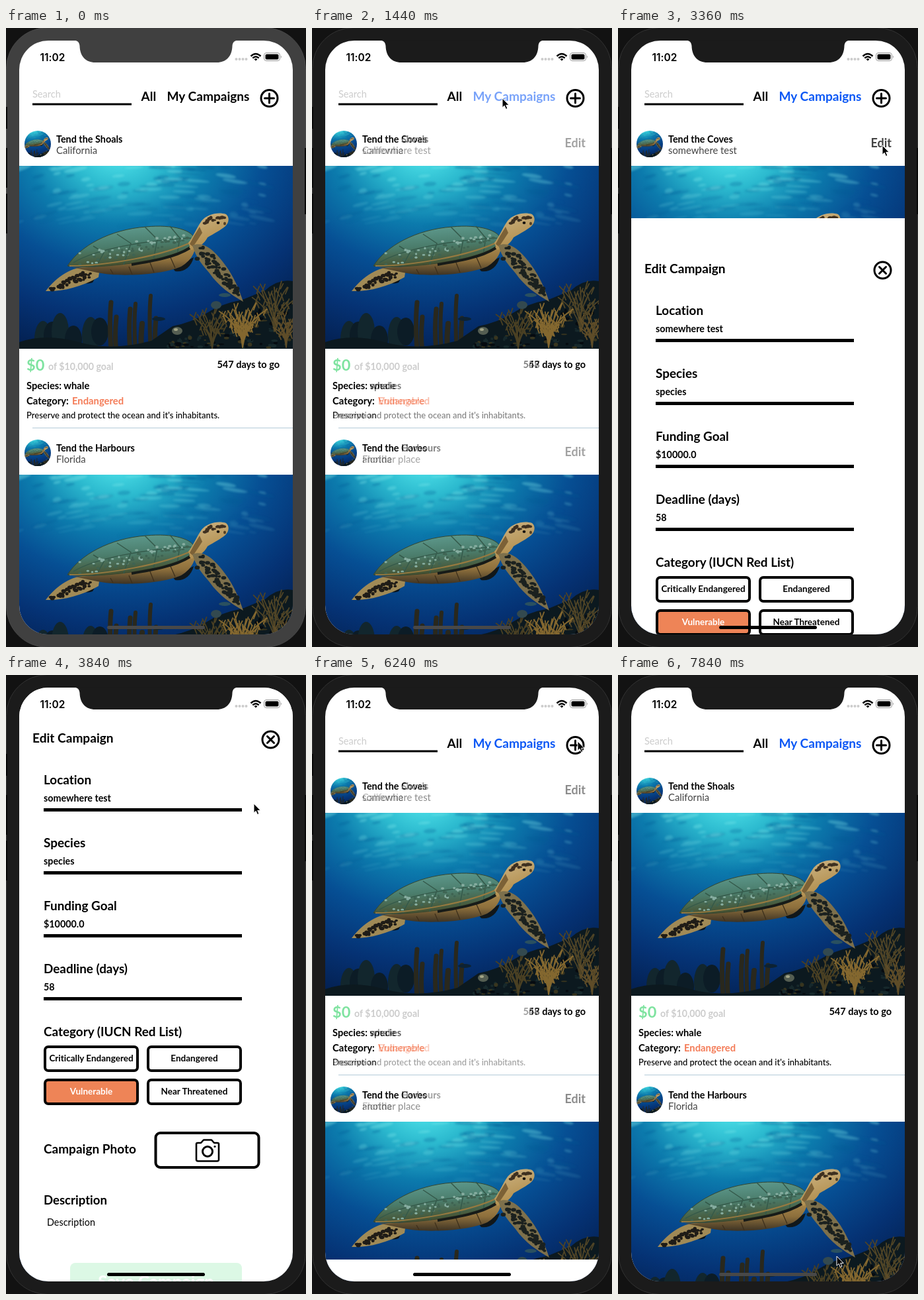
Recreate the animation shown at these times as an HTML page. Size 454 px wide and 934 px high, loop 8000 ms.

```html
<!DOCTYPE html>
<html lang="en">
<head>
<meta charset="utf-8">
<title>Campaign app</title>
<style>
  html, body { margin: 0; width: 100%; height: 100%; overflow: hidden; background: #111; }
  #stage { display: block; width: 100vw; height: 100vh; font-family: Lato, "Open Sans", sans-serif; font-variant-ligatures: none; }
  .b { font-weight: 700; }
  #lists { isolation: isolate; }
  #mine { mix-blend-mode: plus-lighter; }
</style>
</head>
<body>
<svg id="stage" viewBox="0 0 454 934" xmlns="http://www.w3.org/2000/svg">
  <defs>
    <radialGradient id="sea" gradientUnits="userSpaceOnUse" cx="150" cy="-25" r="340" gradientTransform="translate(150 0) scale(1.25 1) translate(-150 0)">
      <stop offset="0" stop-color="#55eaee"/>
      <stop offset=".17" stop-color="#2cbacf"/>
      <stop offset=".33" stop-color="#0c7bad"/>
      <stop offset=".52" stop-color="#064f94"/>
      <stop offset=".74" stop-color="#053274"/>
      <stop offset="1" stop-color="#031a45"/>
    </radialGradient>
    <linearGradient id="shell" x1="0" y1="0" x2=".25" y2="1">
      <stop offset="0" stop-color="#63a196"/>
      <stop offset=".55" stop-color="#4b7d6c"/>
      <stop offset="1" stop-color="#46502f"/>
    </linearGradient>
    <linearGradient id="belly" x1="0" y1="0" x2="0" y2="1">
      <stop offset="0" stop-color="#b99655"/>
      <stop offset=".6" stop-color="#8d6f3c"/>
      <stop offset="1" stop-color="#3d3324"/>
    </linearGradient>
    <linearGradient id="skin" x1="0" y1="0" x2=".4" y2="1">
      <stop offset="0" stop-color="#cdb586"/>
      <stop offset="1" stop-color="#b08c4a"/>
    </linearGradient>
    <filter id="soft" x="-10%" y="-10%" width="120%" height="120%"><feGaussianBlur stdDeviation="1.5"/></filter>
    <symbol id="photo" viewBox="0 0 414 276" preserveAspectRatio="none"></symbol>
    <clipPath id="screen"><rect x="20" y="19" width="414" height="896" rx="44"/></clipPath>
    <clipPath id="face"><circle cx="48" cy="175" r="20"/></clipPath>
  </defs>

  <rect width="454" height="934" fill="#121212"/>
  <rect id="bezel" x="0.5" y="-0.5" width="453" height="935" rx="62" stroke-width="1"/>
  <path d="M0 119h2v33h-2zM0 181h2v60h-2zM0 250h2v60h-2zM452 181h2v100h-2z" fill="#080808"/>

  <g clip-path="url(#screen)">
    <rect x="20" y="19" width="414" height="896" fill="#fff"/>
    <g id="home"></g>
    <g id="lists"><g id="all"></g><g id="mine"></g></g>
    <g id="modal"></g>
    <rect id="bar" x="153" y="902" width="148" height="5" rx="2.5"/>
  </g>

  <path id="notch" d="M102 18.500C109 19 111 22 111.500 27C112 43 121 52 135 52H319C333 52 342 43 342.500 27C343 22 345 19 352 18.500Z"/>
  <g id="status">
    <text x="51.500" y="49.500" font-family="Inter, sans-serif" font-weight="600" font-size="15.500">11:02</text>
    <g fill="#ccc"><circle cx="348.500" cy="47" r="2"/><circle cx="353.500" cy="47" r="2"/><circle cx="358.500" cy="47" r="2"/><circle cx="363.500" cy="47" r="2"/></g>
    <g fill="none" stroke="#000" stroke-width="2.400"><path d="M370.500 42.500Q378 35.500 385.500 42.500M373.300 45.300Q378 41 382.700 45.300"/></g>
    <path d="M375.600 47.200Q378 45 380.400 47.200L378 49.600Z"/>
    <rect x="390.500" y="37.500" width="24" height="12" rx="3.500" fill="none" stroke="#999"/>
    <rect x="392.500" y="39.500" width="20" height="8" rx="2"/>
    <path d="M416 41.500Q418 43.500 416 45.500Z" fill="#999"/>
  </g>
  <path id="cursor" d="M0 0V14.200L3.200 11.300L5.500 16.500L7.900 15.400L5.700 10.400H10.200Z" fill="#000" stroke="#fff" stroke-width="1"/>
</svg>
<script>
const LOOP = 8000, STEP = 160, CARD = 466;
const $ = id => document.getElementById(id);

let seed = 7;
const rnd = () => (seed = seed * 16807 % 2147483647) / 2147483647;
const jitter = w => (rnd() - .5) * w;
const times = (n, f) => Array.from({ length: n }, (_, i) => f(i)).join('');

const text = (x, y, size, str, opt = '') => `<text x="${x}" y="${y}" font-size="${size}" ${opt}>${str}</text>`;
const bold = (x, y, size, str, opt = '') => text(x, y, size, str, 'class="b" ' + opt);
const shape = (d, fill, opt = '') => `<path d="${d}" fill="${fill}" ${opt}/>`;
const blob = (x, y, rx, ry, fill, opt = '') => `<ellipse cx="${x}" cy="${y}" rx="${rx}" ry="${ry}" fill="${fill}" ${opt}/>`;

// Underwater scene
function ripples() {
  const one = () => {
    const y = rnd() * 92, x = rnd() * 370;
    return blob(x, y, 5 + rnd() * 16, 1 + rnd() * 2.5, rnd() < .5 ? '#8af0f0' : '#045a94',
      `opacity="${.36 * (1 - y / 110)}" transform="rotate(${-18 + x / 12} ${x} ${y})"`);
  };
  return `<g filter="url(#soft)">${times(130, one)}</g>`;
}

function spots(x0, y0, x1, y1, width, n, fill, size) {
  return times(n, i => {
    const k = (i + .5) / n, w = width * (1 - k * .7);
    return blob(x0 + (x1 - x0) * k + jitter(w), y0 + (y1 - y0) * k + jitter(w), size * (.6 + rnd() * .6), size * (.5 + rnd() * .4), fill);
  });
}

function fan(x, y, h, n, color) {
  const d = times(n, i => {
    const a = (i / (n - 1) - .5) * 1.15, len = h * (.65 + rnd() * .35);
    const ex = x + Math.sin(a) * len, ey = y - Math.cos(a) * len;
    const twigs = times(4, j => {
      const k = .4 + j * .15, px = x + (ex - x) * k, py = y + (ey - y) * k;
      return `M${px} ${py}l${j % 2 ? 4 : -4} ${-7 - rnd() * 5}`;
    });
    return `M${x} ${y}Q${x + jitter(8)} ${y - len * .5} ${ex} ${ey}` + twigs;
  });
  return `<path d="${d}" fill="none" stroke="${color}" stroke-width="1.800" stroke-linecap="round"/>`;
}

const tube = (x, top, w, color) => `<path d="M${x} 280Q${x - 3} ${top + 30} ${x} ${top}" stroke="${color}" stroke-width="${w}" stroke-linecap="round" fill="none"/>`;

function reef() {
  const left = [36, 50, 62, 82, 108, 122].map((x, i) => blob(x, 262 - i % 3 * 6, 13, 28 - i % 2 * 7, i % 2 ? '#0c1c26' : '#12262d')).join('');
  const tubes = [[139, 206, 7], [147, 228, 7], [168, 216, 7], [176, 208, 6], [199, 196, 6], [207, 230, 7], [186, 238, 8]]
    .map(([x, y, w]) => tube(x, y, w, '#29281d')).join('');
  return left + tubes +
    shape('M0 266Q40 252 90 266T200 264L232 242Q262 236 284 222T338 202L372 188Q392 170 414 174V276H0Z', '#0c191f') +
    times(110, () => { const x = 222 + rnd() * 192; return blob(x, 274 - rnd() * (x - 205) * .37, 1 + rnd() * 4, 1 + rnd() * 2, ['#38351f', '#17292c', '#060b10'][Math.floor(rnd() * 3)]); }) +
    fan(292, 276, 66, 8, '#4a4023') + fan(386, 250, 78, 9, '#4f4426') + fan(338, 274, 70, 13, '#83672f') + fan(404, 274, 52, 8, '#5e4c28') +
    blob(239, 249, 8, 6, '#555e52') + blob(237, 247, 3, 2, '#a3a587') + blob(298, 210, 8, 6, '#33494f') + blob(311, 195, 9, 3, '#2a5060') + blob(211, 231, 10, 3, '#0d2233');
}

function turtle() {
  const shell = 'M73 151C92 121 137 96 192 92C232 88 264 97 266 112C258 127 235 134 205 141C165 149 110 155 73 151Z';
  const seams = 'M82 146C115 126 190 112 260 109M112 121L128 131L117 151M148 103L169 117L158 149M190 92L209 111L203 142M228 91L243 109L239 134';
  return shape('M232 154L264 138C260 154 248 161 236 159Z', '#11171a') +
    shape('M84 165Q104 160 118 164L111 176Q94 182 84 165Z', '#0b1219') +
    shape('M122 155C92 146 62 160 40 189C64 190 94 183 120 168Z', '#a08a56') +
    spots(110, 162, 48, 186, 16, 36, '#1f1c17', 3.3) +
    shape('M80 153C120 156 200 142 262 110C272 124 262 142 245 152C215 165 150 168 118 161Z', 'url(#belly)') +
    `<path d="M138 156l4 7M166 152l5 12M198 146l6 15M228 136l8 18" stroke="#3d2f1b" fill="none" stroke-width="1.300"/>` +
    shape(shell, 'url(#shell)', 'stroke="#344630" stroke-width="1"') +
    `<path d="${seams}" fill="none" stroke="#34594a" stroke-width="1.500"/>` +
    spots(100, 139, 248, 106, 25, 40, '#86ada0', 2.2) +
    spots(100, 143, 256, 110, 22, 34, '#3f6352', 2.4) +
    `<path d="M76 151C130 151 220 136 265 113" fill="none" stroke="#977a40" stroke-width="2"/>` +
    `<path d="M170 149C200 144 236 138 258 124" fill="none" stroke="#171b18" stroke-width="4"/>` +
    shape('M256 116C264 106 268 94 276 83C284 73 301 69 313 73C319 78 317 86 312 91C305 97 295 102 285 108C281 116 272 124 260 127Z', 'url(#skin)') +
    shape('M258 118Q265 104 273 92L277 101Q270 112 263 122Z', '#7c6136') +
    spots(280, 84, 311, 77, 9, 14, '#3e3020', 3) + blob(301, 86, 2.4, 2, '#15120f') + blob(311, 87, 2, 2.5, '#514027') +
    shape('M262 120C280 113 296 128 312 150C324 166 332 184 339 205C320 194 302 182 288 162C278 150 268 140 262 120Z', '#7d704c') +
    spots(276, 130, 332, 194, 22, 54, '#1b211f', 3.6);
}

$('photo').innerHTML = '<rect width="414" height="276" fill="url(#sea)"/>' + ripples() + reef() + turtle();

// Campaign list
const cross = (x, y, arms) => `<g fill="none" stroke="#000" stroke-width="3"><circle cx="${x}" cy="${y}" r="12.500"/><path stroke-linecap="round" transform="translate(${x} ${y})" d="${arms}"/></g>`;

const cardBase = i => `<g transform="translate(0 ${i * CARD})">
  <use href="#photo" x="20" y="208" width="414" height="276"/>
  <g clip-path="url(#face)"><use href="#photo" x="18" y="155" width="60" height="40"/></g>
  ${bold(31, 517, 23.5, '$0', 'fill="#7fe3a0"')}
  ${bold(64, 516, 14.2, 'of $10,000 goal', 'fill="#ccc"')}
  ${bold(31, 568, 14.8, 'Category:')}
  <path d="M40 603.500H434" stroke="#b4cbd9"/>
</g>`;

const cardText = (c, i) => `<g transform="translate(0 ${i * CARD})">
  ${bold(76, 173, 14.4, c.title)}
  ${text(76, 190, 14.8, c.place, 'fill="#444"')}
  ${c.edit ? bold(414, 180, 18, 'Edit', 'fill="#444" text-anchor="end"') : ''}
  ${bold(414, 513, 14.5, c.days + ' days to go', 'text-anchor="end"')}
  ${bold(31, 545, 14.7, 'Species: ' + c.species)}
  ${bold(100, 568, 14.8, c.status, 'fill="#f47c58"')}
  ${text(31, 589, 13, c.about, 'font-weight="500"')}
</g>`;

const open = { days: 547, species: 'whale', status: 'Endangered', about: "Preserve and protect the ocean and it's inhabitants." };
const own = { title: 'Tend the Coves', days: 58, species: 'species', status: 'Vulnerable', about: 'Description', edit: true };

$('home').innerHTML = text(40, 105, 14.6, 'Search', 'fill="#ccc"') +
  '<rect x="40" y="113.500" width="150" height="3"/>' +
  bold(204.5, 110, 19, 'All') + bold(243.5, 110, 19.1, 'My Campaigns', 'id="tab"') +
  cross(398.5, 106, 'M-7 0H7M0 -7V7') + cardBase(0) + cardBase(1);
$('all').innerHTML = cardText({ ...open, title: 'Tend the Shoals', place: 'California' }, 0) +
  cardText({ ...open, title: 'Tend the Harbours', place: 'Florida' }, 1);
$('mine').innerHTML = cardText({ ...own, place: 'somewhere test' }, 0) + cardText({ ...own, place: 'another place' }, 1);

// Edit form
const field = ([label, value], i) => bold(57, 165 + i * 95, 18.9, label) + bold(57, 191 + i * 95, 14.3, value) +
  `<rect x="57" y="${201 + i * 95}" width="300" height="5"/>`;
const choice = (label, i) => {
  const x = 57 + i % 2 * 156, y = 559 + (i >> 1) * 50, on = label === 'Vulnerable';
  return `<rect x="${x + 2}" y="${y + 2}" width="140" height="36" rx="5" fill="${on ? '#ee8457' : '#fff'}" stroke="#000" stroke-width="4"/>` +
    bold(x + 72, y + 24, 13.5, label, `text-anchor="middle" fill="${on ? '#fff' : '#000'}"`);
};
$('modal').innerHTML = '<rect x="20" y="19" width="414" height="896" fill="#fff"/>' +
  bold(40, 102, 19.1, 'Edit Campaign') + cross(400.5, 97.5, 'M-5 -5L5 5M5 -5L-5 5') +
  [['Location', 'somewhere test'], ['Species', 'species'], ['Funding Goal', '$10000.0'], ['Deadline (days)', '58']].map(field).join('') +
  bold(57, 545, 18.9, 'Category (IUCN Red List)') +
  ['Critically Endangered', 'Endangered', 'Vulnerable', 'Near Threatened'].map(choice).join('') +
  bold(57, 722, 19, 'Campaign Photo') +
  `<g fill="none" stroke="#000"><rect x="226.500" y="691" width="156" height="52" rx="7" stroke-width="4"/>
   <path stroke-width="2.600" stroke-linejoin="round" d="M290 706H295L299 701.500H311L315 706H320Q322 706 322 708V731Q322 733.500 319.500 733.500H290.500Q288 733.500 288 731V708Q288 706 290 706Z"/>
   <circle cx="305" cy="719" r="7.500" stroke-width="3"/></g><circle cx="316" cy="711.500" r="1.600"/>` +
  bold(57, 799, 18.6, 'Description') + text(62, 831, 14.4, 'Description') +
  '<rect x="97" y="887" width="260" height="50" rx="8" fill="#dcf8e5"/>' +
  bold(227, 925, 26, 'Save Campaign', 'text-anchor="middle" fill="#fff"');

// Motion
const clamp = v => Math.min(1, Math.max(0, v));
const ramp = (t, a, b) => clamp((t - a) / (b - a));
const spring = ms => {
  if (ms <= 0) return 0;
  const k = ms * .0163, p = 1 - (1 + k) * Math.exp(-k);
  return p > .99 ? 1 : p;
};

// Pointer stops: time, x, y
const stops = [[0, 470, 420], [1120, 288, 106], [2240, 288, 106], [3040, 400, 177], [3360, 400, 177], [3840, 375, 194],
  [4320, 366, 300], [4640, 360, 332], [4960, 360, 332], [5600, 402, 100], [6240, 402, 100], [7840, 331, 877]];

// Speed at a stop: zero at rests, else the slope between its neighbours
function speed(i, axis) {
  const a = stops[i - 1], b = stops[i], c = stops[i + 1];
  if (!a || !c || a[axis] === b[axis] || b[axis] === c[axis]) return 0;
  return (c[axis] - a[axis]) / (c[0] - a[0]);
}

function pointer(t, axis) {
  const i = stops.findIndex(s => s[0] > t);
  if (i < 0) return stops[stops.length - 1][axis];
  const a = stops[i - 1], b = stops[i], span = b[0] - a[0], k = (t - a[0]) / span;
  const e = k * k * (3 - 2 * k);
  return a[axis] + (b[axis] - a[axis]) * e +
    span * k * (1 - k) * ((1 - k) * speed(i - 1, axis) - k * speed(i, axis));
}

function fade(id, amount) {
  $(id).setAttribute('opacity', amount);
  $(id).style.display = amount ? '' : 'none';
}

function draw(t) {
  const focused = t >= 160, shell = focused ? '#1b1b1b' : '#404040';
  $('bezel').setAttribute('fill', shell);
  $('bezel').setAttribute('stroke', focused ? '#333' : '#4a4a4a');
  $('notch').setAttribute('fill', shell);

  const mine = ramp(t, 1260, 1620) - ramp(t, 6110, 6450);
  fade('all', 1 - mine);
  fade('mine', mine);

  $('tab').setAttribute('fill', t < 1280 ? '#000' : '#0a57f5');
  $('tab').setAttribute('opacity', t < 1280 ? 1 : clamp(.3 + .7 * (t - 1280) / 450));

  const shown = spring(t - 3210) - spring(t - 5927);
  $('modal').setAttribute('transform', `translate(0 ${Math.round(896 * (1 - shown))})`);
  $('modal').style.display = shown > 0 ? '' : 'none';
  $('bar').setAttribute('fill', shown > 0 ? '#000' : '#484848');

  $('cursor').setAttribute('transform', `translate(${pointer(t, 1)} ${pointer(t, 2)})`);
}

const start = performance.now();
function tick() {
  const t = (performance.now() - start) % LOOP;
  draw(Math.floor(t / STEP) * STEP);
  requestAnimationFrame(tick);
}
tick();
</script>
</body>
</html>
```
